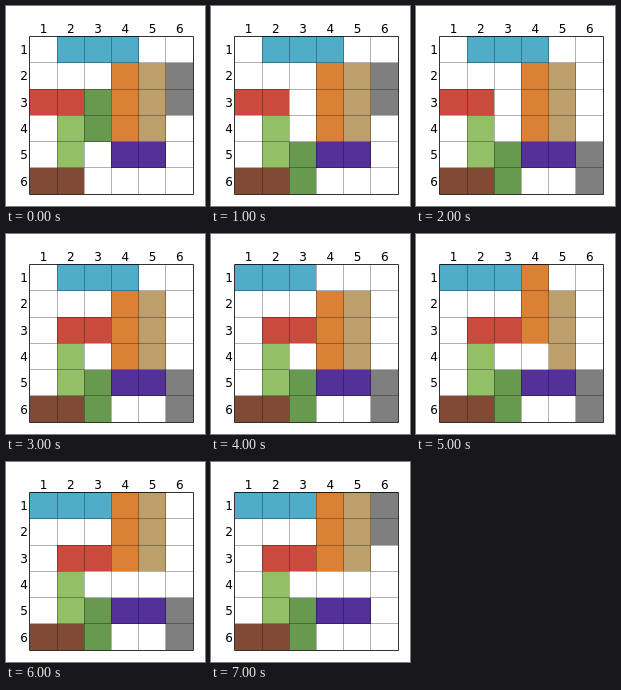
Recreate the animation shown at these times as an HTML page. Size 199 by 200 pixels, loop 8 s.

```html
<!DOCTYPE html>
<html lang="en">
<head>
<meta charset="utf-8">
<title>Sliding blocks</title>
<style>
html, body { margin: 0; width: 100%; height: 100%; overflow: hidden; background: #fff; }
svg { display: block; width: 100vw; height: 100vh; }
text { font: 12px "DejaVu Sans", sans-serif; }
.cols text { text-anchor: middle; }
.rows text { text-anchor: end; }
path { fill: none; stroke: #000; }
rect { shape-rendering: crispEdges; animation: 8s step-end infinite; }

#green { animation-name: green; }
#gray { animation-name: gray; }
#red { animation-name: red; }
#blue { animation-name: blue; }
#orange { animation-name: orange; }
#tan { animation-name: tan; }

@keyframes green { 12.5%, 100% { y: 136px; height: 52px; } }
@keyframes gray {
  25% { y: 136px; height: 52px; }
  87.5%, 100% { y: 30px; height: 53px; }
}
@keyframes red { 37.5%, 100% { x: 51px; } }
@keyframes blue { 50%, 100% { x: 24px; width: 81px; } }
@keyframes orange { 62.5%, 100% { y: 30px; } }
@keyframes tan { 75%, 100% { y: 30px; } }
</style>
</head>
<body>
<svg viewBox="0 0 199 200">
  <rect id="blue" x="51" y="30" width="82" height="27" fill="#4fadca"/>
  <rect id="orange" x="105" y="57" width="28" height="79" fill="#db8135"/>
  <rect id="tan" x="133" y="57" width="27" height="79" fill="#bc9f6b"/>
  <rect id="gray" x="160" y="57" width="27" height="52" fill="#7f7f7f"/>
  <rect id="red" x="24" y="83" width="54" height="26" fill="#ca4b3d"/>
  <rect id="green" x="78" y="83" width="27" height="53" fill="#67994f"/>
  <rect x="51" y="109" width="27" height="53" fill="#93bf66"/>
  <rect x="105" y="136" width="55" height="26" fill="#533198"/>
  <rect x="24" y="162" width="54" height="26" fill="#804a34"/>

  <path stroke-opacity=".3" d="M51.5 31V188M78.5 31V188M105.5 31V188M132.5 31V188M159.5 31V188M24 56.5H187M24 83.5H187M24 109.5H187M24 135.5H187M24 161.5H187"/>
  <path stroke-opacity=".8" d="M23.5 30.5H187.5V188.5H23.5Z"/>

  <g class="cols">
    <text x="37.5" y="27">1</text>
    <text x="64.7" y="27">2</text>
    <text x="92" y="27">3</text>
    <text x="119.2" y="27">4</text>
    <text x="146.5" y="27">5</text>
    <text x="173.7" y="27">6</text>
  </g>
  <g class="rows">
    <text x="22" y="48">1</text>
    <text x="22" y="74">2</text>
    <text x="22" y="101">3</text>
    <text x="22" y="127">4</text>
    <text x="22" y="153">5</text>
    <text x="22" y="180">6</text>
  </g>
</svg>
</body>
</html>
```
